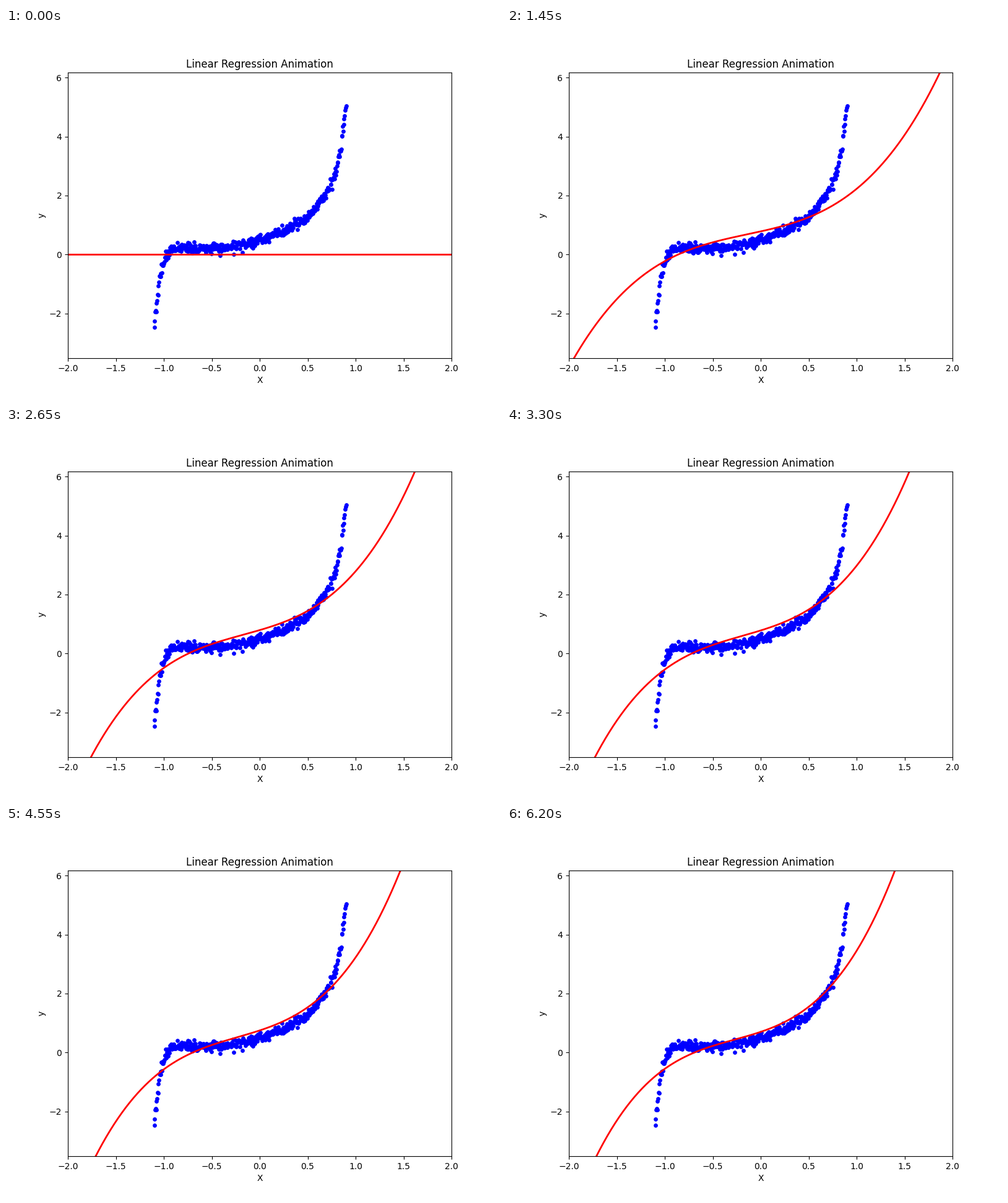
Recreate the animation shown at these times as a matplotlib script. Size 800 by 600 pixels, loop 6.25 s.

```python
import numpy as np
import matplotlib.pyplot as plt
from matplotlib.animation import FuncAnimation

FRAMES, INTERVAL = 125, 50
RATE = 0.081
LO, HI = -1.1, 0.9

# Key points of the noise-free curve
CURVE = [
    (-1.1, -2.4), (-1.075, -1.65), (-1.05, -0.95), (-1.02, -0.45),
    (-0.98, -0.03), (-0.92, 0.2), (-0.8, 0.23), (-0.5, 0.18), (-0.25, 0.28),
    (0, 0.48), (0.25, 0.77), (0.5, 1.27), (0.65, 1.85), (0.75, 2.45),
    (0.8, 2.95), (0.85, 3.8), (0.9, 5.12),
]


def make_cloud(n=400):
    rng = np.random.default_rng(4)
    x = np.linspace(LO, HI, n)
    return x, np.interp(x, *zip(*CURVE)) + rng.normal(0, 0.09, n)


def descend():
    """Gradient descent of a cubic on evenly spread x; the bias learns twice as fast."""
    k = np.add.outer(np.arange(4), np.arange(4)) + 1
    gram = (HI ** k - LO ** k) / ((HI - LO) * k)
    goal = np.array([0.7486, 0.434, 0.259, 0.276])  # mean of y * x**k
    rate = RATE * np.array([2, 1, 1, 1])
    path = [np.zeros(4)]
    for _ in range(FRAMES - 1):
        w = path[-1]
        path.append(w + rate * (goal - gram @ w))
    return path


weights = descend()
grid = np.linspace(-2, 2, 200)
powers = np.vander(grid, 4, increasing=True)

fig, ax = plt.subplots(figsize=(8, 6), dpi=100)
ax.scatter(*make_cloud(), s=15, color="blue")
line, = ax.plot(grid, powers @ weights[0], color="red", lw=2)
ax.set(xlim=(-2, 2), ylim=(-3.513, 6.171), xlabel="X", ylabel="y",
       title="Linear Regression Animation")


def update(i):
    line.set_ydata(powers @ weights[i])
    return line,


anim = FuncAnimation(fig, update, frames=FRAMES, interval=INTERVAL,
                     repeat=True, repeat_delay=0)
plt.show()
```
